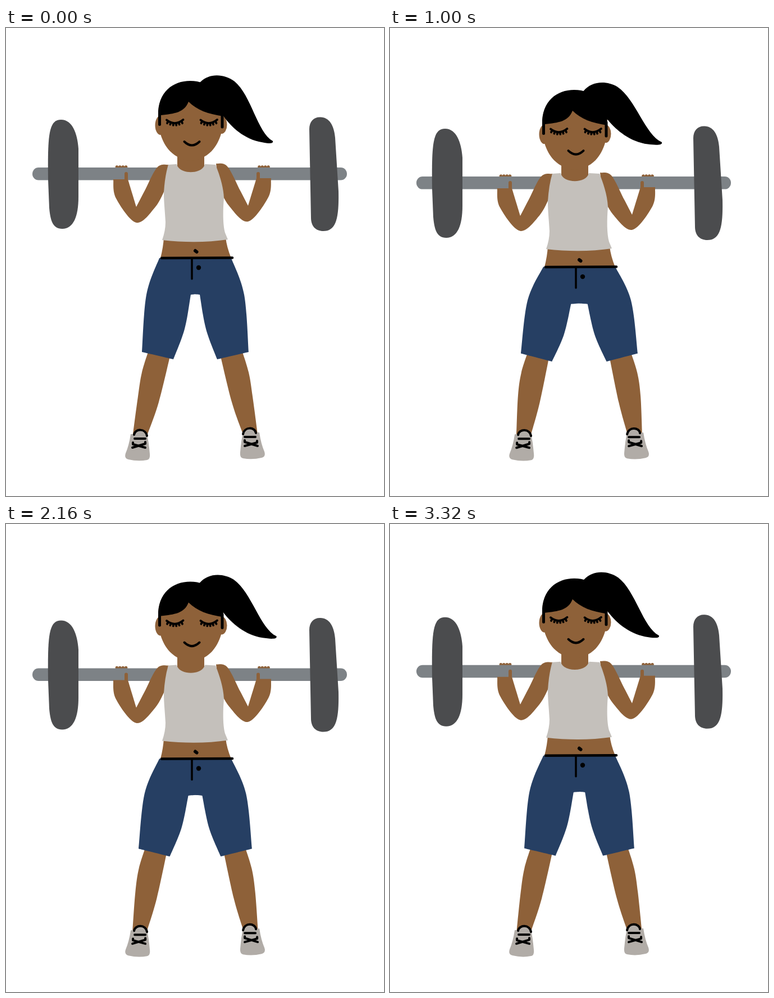
Recreate the animation shown at these times as an HTML page. Size 673x832 px, loop 3.36 s.

```html
<!DOCTYPE html>
<html lang="en">
<head>
<meta charset="utf-8">
<title>Squats</title>
<style>
html, body { margin: 0; width: 100%; height: 100%; overflow: hidden; background: #fff; }
svg { display: block; width: 673px; height: 832px; }
.skin { fill: #8e6139; }
.finger { stroke: #8e6139; fill: none; stroke-width: 5.5; stroke-linecap: round; }
.ink { stroke: #000; fill: none; stroke-width: 4; stroke-linecap: round; stroke-linejoin: round; }
.plate { fill: #4b4c4e; }
.bar { fill: #7d8286; }
.shirt { fill: #c4c0bb; }
.shorts { fill: #263f63; }
.shoe { fill: #b1aca7; }
</style>
</head>
<body>
<svg viewBox="0 0 673 832">
  <path id="leg" class="skin"/>
  <use href="#leg" transform="matrix(-1 0 0 1 674 0)"/>
  <g id="shoes">
    <g id="shoe">
      <path class="shoe" d="M227 722C230 713 248 713 251 722Q254 735 256 757Q257 767 251 768Q235 771 218 767Q210 765 213 756Q219 742 222 722Z"/>
      <path class="ink" d="M228 723C230 712 248 711 251 725M229 730H248M226 737V740L248 746M248 736V739L225 746"/>
    </g>
    <use href="#shoe" transform="matrix(-1 0 0 1 673 -3)"/>
  </g>
  <path id="shorts" class="shorts"/>
  <use href="#shorts" transform="matrix(-1 0 0 1 674 0)"/>
  <g id="upper">
    <path class="skin" d="M281 372H391Q393 390 401 409H275Q280 390 281 372Z"/>
    <path class="ink" style="stroke-width:4.500" d="M277 409L403 408.500"/>
    <path class="ink" style="stroke-width:3.500" d="M331 411V446"/>
    <circle cx="343" cy="426" r="4.200"/>
    <path class="ink" style="stroke-width:6" d="M337 396L339.500 398"/>
    <path id="fingers" class="finger"/>
    <rect class="bar" x="47" y="248" width="560" height="22.500" rx="11"/>
    <path class="plate" d="M98 163C118 163 127 187 129 215V300C129 335 120 357 100 357C83 357 79 342 77 320L75 270C74 190 76 163 98 163Z"/>
    <path class="plate" d="M560 158.500C575 159 584 172 586 195L592 290C593 338 588 361 565 361C551 361 543 352 543 337L540 180C540 166 548 158 560 158.500Z"/>
    <path id="arm" class="skin"/>
    <use href="#arm" transform="matrix(-1 0 0 1 663 -2)"/>
    <path class="finger" style="stroke-width:6" d="M214 259V272M449 259V272"/>
    <rect class="skin" x="305" y="215" width="48" height="46"/>
    <path class="shirt" d="M289 243L304 242C308 261 350 261 354 242L373 243C379 258 387 280 388 302C386 325 386 350 390 364L395 376Q340 384 278 377Q284 360 284 345C283 325 281 310 281 292Q283 262 289 243Z"/>
    <ellipse class="skin" cx="275" cy="173" rx="9.500" ry="17"/>
    <ellipse class="skin" cx="384" cy="172" rx="9.500" ry="16"/>
    <path class="skin" d="M271 150C270 178 276 202 292 219C302 229 317 236 329 236C341 236 356 229 366 219C382 202 388 178 387 150C386 115 364 98 329 98C294 98 273 115 271 150Z"/>
    <path d="M271 155C270 114 297 94 328 94C362 94 387 118 387 157C360 153 340 146 325 131C317 151 300 152 276 155Z"/>
    <path id="tail" d="M335 115L346 96C362 80 388 81 407 95C437 120 447 185 475 201C477 207 463 205 450 202C420 195 397 172 384 152Z"/>
    <path class="ink" style="stroke-width:5" d="M273.500 150V171.500M385 152V176"/>
    <path class="ink" d="M317.500 202Q331 215 344.500 202"/>
    <path id="eyes" class="ink" style="stroke-width:3.800"/>
  </g>
</svg>
<script>
const $ = id => document.getElementById(id);

// Left-hand parts: runs of [x, y, dx, dy], where dx, dy is the shift in a full squat.
// Runs are smooth and meet at corners.
const parts = {
  leg: [
    [[255, 570, -45, 20], [242, 612, -43, 6], [235, 655, -37, -5], [226, 722, -5, 3]],
    [[252, 722, -5, 2]],
    [[272, 665, -28, 5], [294, 575, -50, 25]]
  ],
  shorts: [
    [[273, 409, 0, 94], [250, 474, -26, 60], [242, 576, -47, 15]],
    [[298, 589, -50, 24]],
    [[318, 535, -44, 63], [329, 474, -35, 101]],
    [[340, 473, 0, 98]],
    [[340, 409, 0, 97]]
  ],
  arm: [
    [[289, 243, 0, 0], [269, 248, 0, 0], [246, 291, 0, 0], [232, 318, 0, 0]],
    [[217, 269, 0, 0]],
    [[191, 269, -1, 0]],
    [[196, 303, -2, -2], [232, 346, -2, -8], [266, 318, 0, -4], [284, 285, 0, 0]]
  ]
};

// Catmull-Rom curve through each run.
function outline(runs) {
  let last = runs[0][0];
  let d = `M${last}`;
  runs.forEach((run, n) => {
    const pts = n ? [last, ...run] : run;
    const handle = (p, a, b) => p.map((v, k) => v + (b[k] - a[k]) / 6);
    for (let i = 0; i + 1 < pts.length; i++) {
      const p = pts[i], q = pts[i + 1];
      const before = pts[i - 1] || p, after = pts[i + 2] || q;
      d += `C${handle(p, before, q)} ${handle(q, after, p)} ${q}`;
    }
    last = pts[pts.length - 1];
  });
  return d + 'Z';
}

function drawDetails() {
  let eyes = '', fingers = '';
  for (const cx of [300.5, 361]) {
    eyes += `M${cx - 14.5} 163.500Q${cx} 175 ${cx + 15} 163`;
    for (let x = -12; x <= 12; x += 4.8) {
      eyes += `M${cx + x} ${169.500 - x * x / 38}l${x / 8} 3.500`;
    }
  }
  for (const cx of [205.5, 459]) {
    for (let i = -1.5; i < 2; i++) fingers += `M${cx + i * 5.400} 247L${cx + i * 4} 260`;
  }
  $('eyes').setAttribute('d', eyes);
  $('fingers').setAttribute('d', fingers);
}

const STEP = 40, DOWN = 12, UP = 15, STEPS = DOWN + UP + 1;
const DROP = 97, SWING = -22.6;

// 0 standing, 1 squatting; the lowest pose is held for two steps.
const bendAt = step => step <= DOWN ? step / DOWN : ((STEPS - step) / UP) ** 0.82;

function draw(step) {
  const bend = bendAt(step);
  const drop = (1 - Math.cos(Math.PI * bend)) / 2;
  const spread = bend ** 1.25;
  for (const id in parts) {
    const posed = parts[id].map(run => run.map(([x, y, dx, dy]) => [x + dx * spread, y + dy * drop]));
    $(id).setAttribute('d', outline(posed));
  }
  $('upper').setAttribute('transform', `translate(0 ${DROP * drop})`);
  $('tail').setAttribute('transform', `rotate(${SWING * bend} 345 110)`);
  $('shoes').setAttribute('transform', `translate(${bend / 2} ${bend})`);
}

const start = performance.now();
let shown = -1;
function tick() {
  const step = Math.floor((performance.now() - start) / STEP) % STEPS;
  if (step !== shown) draw(shown = step);
  requestAnimationFrame(tick);
}
drawDetails();
tick();
</script>
</body>
</html>
```
